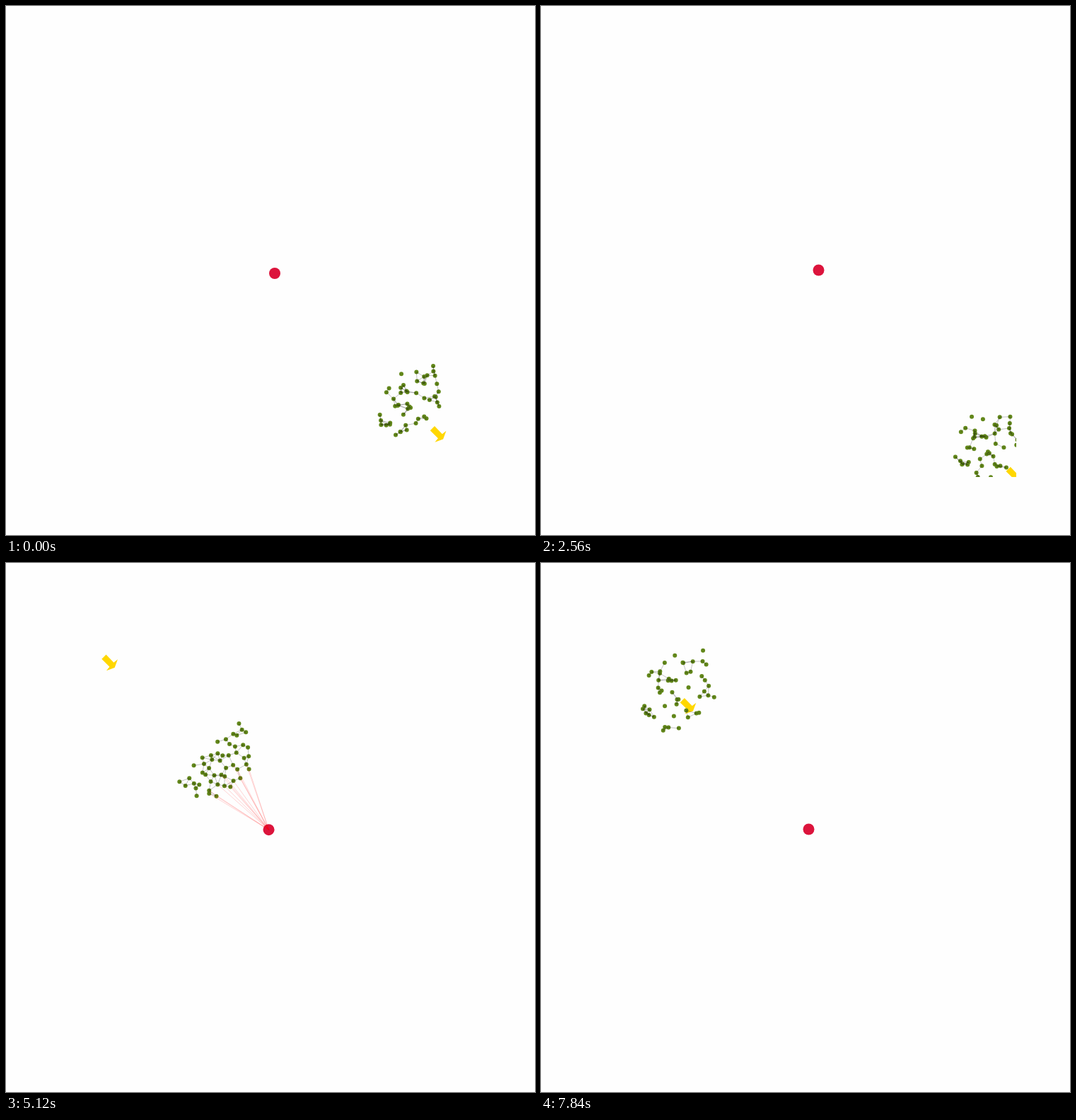
Write an HTML page with a canvas that moves like this. It is 748 by 748 pixels and loops after 8 s.

```html
<!DOCTYPE html>
<html lang="en">
<head>
<meta charset="utf-8">
<title>Flock</title>
<style>
html, body { margin: 0; width: 100%; height: 100%; overflow: hidden; background: #fefefe; }
canvas { display: block; width: 100vmin; height: 100vmin; }
</style>
</head>
<body>
<canvas id="stage" width="748" height="748"></canvas>
<script>
const ctx = document.getElementById('stage').getContext('2d');
const STEP = 160, STEPS = 50, COUNT = 50;
const WORLD = { x: 92, y: 86, size: 580 };
const LINK = 15, SIGHT = 105;
const GOLDEN = Math.PI * (3 - Math.sqrt(5));

// step, centre x, centre y, half length, half depth, half-disc amount
const poses = [
  [0, 574, 559, 57, 37, 0],
  [6, 597, 582, 52, 44, 0],
  [16, 632, 622, 51, 44, 0],
  [21, 580, 572, 50, 48, .3],
  [24, 450, 432, 46, 47, 1],
  [28, 349, 328, 75, 76, 1],
  [37, 204, 189, 53, 51, 1],
  [49, 193, 180, 61, 48, 0]
];

// step, x, y
const dotPath = [
  [0, 380, 378], [6, 379, 380], [16, 392.5, 373.5], [24, 383.5, 380],
  [28, 373, 378.5], [37, 374, 378], [49, 378.5, 376.5]
];

let seed = 7;
const random = () => (seed = seed * 16807 % 2147483647) / 2147483647;

// Even spiral over the unit disc, plus a jitter and drift of each member's own
const flock = Array.from({ length: COUNT }, (_, i) => {
  const r = Math.sqrt((i + .5) / COUNT), angle = i * GOLDEN;
  return {
    p: r * Math.cos(angle), w: r * Math.sin(angle),
    jp: (random() - .5) * .4, jw: (random() - .5) * .4,
    fx: .25 + random() * .4, fy: .25 + random() * .4,
    ax: random() * 6.28, ay: random() * 6.28
  };
});

const mix = (a, b, t) => a + (b - a) * t;
const dist = (a, b) => Math.hypot(a.x - b.x, a.y - b.y);

function sample(keys, s) {
  let i = 0;
  while (i < keys.length - 2 && s >= keys[i + 1][0]) i++;
  const a = keys[i], b = keys[i + 1], t = (s - a[0]) / (b[0] - a[0]);
  return { t, v: a.map((n, k) => mix(n, b[k], t)) };
}

// p runs up and right, w runs down and right
function members(s) {
  const [, cx, cy, length, depth, half] = sample(poses, s).v;
  const loose = 1 - .75 * half, drift = 4 * loose;
  return flock.map(m => {
    const rim = Math.sqrt(1 - m.p * m.p);
    const p = (m.p + m.jp * loose) * length * Math.SQRT1_2;
    const w = (mix(m.w, (m.w + rim) / 2, half) + m.jw * loose) * depth * Math.SQRT1_2;
    return {
      x: cx + p + w + drift * Math.sin(s * m.fx + m.ax),
      y: cy - p + w + drift * Math.sin(s * m.fy + m.ay)
    };
  });
}

function dotAt(s) {
  const { t, v } = sample(dotPath, s), sway = 2 * Math.sin(Math.PI * t);
  return { x: v[1] + sway * Math.sin(s * 2.3), y: v[2] + sway * Math.cos(s * 1.7) };
}

function circle(c, r, color) {
  ctx.fillStyle = color;
  ctx.beginPath();
  ctx.arc(c.x, c.y, r, 0, 2 * Math.PI);
  ctx.fill();
}

function line(a, b) {
  ctx.beginPath();
  ctx.moveTo(a.x, a.y);
  ctx.lineTo(b.x, b.y);
  ctx.stroke();
}

function arrow(s) {
  const shift = 3.61 * s - (s >= 21 ? WORLD.size : 0);
  ctx.save();
  ctx.translate(602.9 + shift, 597.2 + shift);
  ctx.rotate(Math.PI / 4);
  ctx.fillStyle = '#ffd700';
  ctx.beginPath();
  ctx.moveTo(21.5, 0);
  for (const side of [1, -1]) {
    const corners = [[16.3, 11.3], [15.5, 4.2], [0, 4.4]];
    if (side < 0) corners.reverse();
    for (const [x, y] of corners) ctx.lineTo(x, y * side);
  }
  ctx.fill();
  ctx.restore();
}

function draw(s) {
  const all = members(s), dot = dotAt(s);
  ctx.fillStyle = '#fefefe';
  ctx.fillRect(0, 0, 748, 748);
  ctx.save();
  ctx.beginPath();
  ctx.rect(WORLD.x, WORLD.y, WORLD.size, WORLD.size);
  ctx.clip();

  arrow(s);
  circle(dot, 8, '#dc143c');
  for (const m of all) circle(m, 3, '#62871a');

  ctx.lineWidth = .6;
  ctx.strokeStyle = 'rgba(0, 0, 0, .4)';
  all.forEach((a, i) => {
    for (const b of all.slice(i + 1)) if (dist(a, b) < LINK) line(a, b);
  });

  ctx.lineWidth = .8;
  ctx.strokeStyle = 'rgba(255, 0, 0, .22)';
  for (const m of all) if (dist(m, dot) < SIGHT) line(dot, m);
  ctx.restore();
}

const begin = performance.now();
function tick() {
  draw(Math.floor((performance.now() - begin) / STEP) % STEPS);
  requestAnimationFrame(tick);
}
tick();
</script>
</body>
</html>
```
